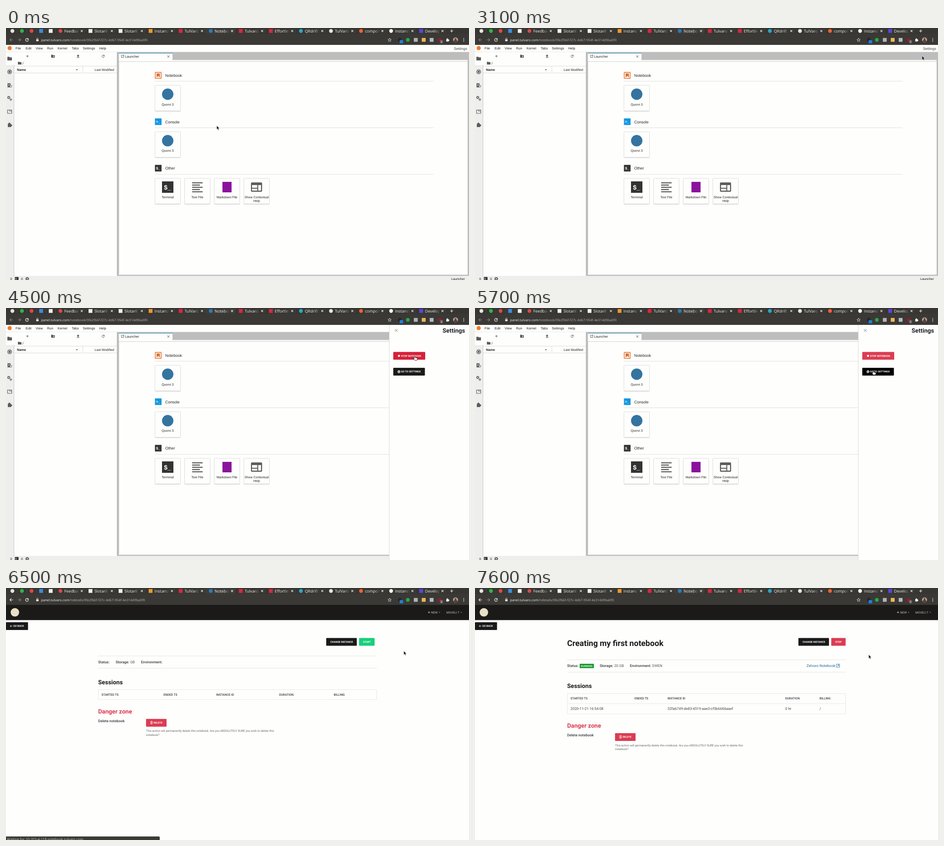
Write an HTML page that moves like this. It is 1015 by 552 pixels and loops after 8 s.

```html
<!DOCTYPE html>
<html lang="en">
<head>
<meta charset="utf-8">
<title>Notebook settings</title>
<style>
html, body { margin: 0; width: 100%; height: 100%; overflow: hidden; background: #fefefd }
svg { display: block }
text { white-space: pre; text-rendering: geometricPrecision }
.u { font-family: "Open Sans", "Noto Sans", sans-serif }
.a { font-family: "Liberation Sans", Arial, sans-serif }
.r { font-family: Roboto, sans-serif }
.m { font-weight: 500 }
.b { font-weight: 700 }
.mid { text-anchor: middle }
.end { text-anchor: end }
</style>
</head>
<body>
<svg id="stage" width="1015" height="552" viewBox="0 0 1015 552"></svg>
<script>
const WHITE = '#fefefd', BAR = '#3a3936', INK = '#212121', GREY = '#5c5c5c', RED = '#dc3c52', BLACK = '#1a1a1a';

// Shape helpers; text is placed by the middle of its capitals.
const rect = (x, y, w, h, fill, more = '') => `<rect x="${x}" y="${y}" width="${w}" height="${h}" fill="${fill}" ${more}/>`;
const circle = (x, y, r, fill, more = '') => `<circle cx="${x}" cy="${y}" r="${r}" fill="${fill}" ${more}/>`;
const square = (x, y, r, fill) => rect(x - r, y - r, 2 * r, 2 * r, fill);
const line = (d, color, w = 1, fill = 'none') => `<path d="${d}" stroke="${color}" stroke-width="${w}" fill="${fill}"/>`;
const fillPath = (d, fill) => `<path d="${d}" fill="${fill}"/>`;
const text = (x, y, s, size, cls, fill = INK) =>
  `<text x="${x}" y="${(y + size * .36).toFixed(2)}" font-size="${size}" class="${cls}" fill="${fill}">${s}</text>`;
const group = (id, body) => `<g id="${id}">${body}</g>`;

const cross = (x, y, r, color, w = 1) => line(`M${x - r} ${y - r}l${2 * r} ${2 * r}m0 ${-2 * r}l${-2 * r} ${2 * r}`, color, w);
const plus = (x, y, r, color, w = 1) => line(`M${x - r} ${y}h${2 * r}M${x} ${y - r}v${2 * r}`, color, w);
const gear = (x, y, r, color) =>
  circle(x, y, r * .6, 'none', `stroke="${color}" stroke-width="${r * .45}"`) +
  circle(x, y, r * .9, 'none', `stroke="${color}" stroke-width="${r * .35}" stroke-dasharray="${r * .36} ${r * .347}"`);
const folder = (x, y, s) => fillPath(`M${x - s} ${y - s * .8}h${s * .8}l${s * .25} ${s * .25}h${s * .95}v${s * 1.35}h${-2 * s}z`, GREY);
const puzzle = (x, y, s, color) =>
  rect(x - s * .8, y - s * .45, s * 1.45, s * 1.45, color) + circle(x - s * .1, y - s * .55, s * .42, color) + circle(x + s * .7, y + s * .25, s * .4, color);
const reload = (x, y, r, color, w) =>
  line(`M${x + r * .8} ${y - r * .6}A${r} ${r} 0 1 0 ${x + r} ${y + r * .3}`, color, w) + fillPath(`M${x + r * 1.1} ${y - r * 1.2}v${r * 1.1}h${-r * 1.1}z`, color);
const arrow = (x, y, dir, color) => line(`M${x - 3.5 * dir} ${y}h${7 * dir}m${-3.4 * dir} -3.4l${3.4 * dir} 3.4l${-3.4 * dir} 3.4`, color, 1.1);
const caret = (x, y, color) => fillPath(`M${x - 1.6} ${y - .8}h3.2l-1.6 1.7z`, color);
const button = (x, y, w, h, fill, label, tx, id = '') =>
  rect(x, y, w, h, fill, `rx="1.2" ${id && `id="${id}"`}`) + text(tx, y + h / 2, label, 5.5, 'r b', '#fff');

function browser() {
  const pins = [[circle, '#e4e4e2'], [circle, '#2bb741'], [circle, '#d9493f'], [square, '#3d8be0'], [square, '#efefed']];
  const tabs = [
    ['Feedback', circle, '#d9493f'], ['Slotaril', square, '#f2f2f0'], ['Slotaril', square, '#f2f2f0'], ['Instance', square, '#f0962e'],
    ['TulVaro', square, '#d8293b'], ['Notebook', circle, '#2b7cb8'], ['Tulvaro', square, '#d8293b'], ['Effortless', square, '#d8293b'],
    ['QRdrift', circle, '#27a9c9'], ['TulVaro', circle, '#e4e4e2'], ['component', circle, '#ef6130'], ['Instance', circle, '#f2f2f0'],
    ['Develop', square, '#5b45dd']];
  let s = `<defs><linearGradient id="fade"><stop stop-color="${BAR}" stop-opacity="0"/><stop offset="1" stop-color="${BAR}"/></linearGradient></defs>`;
  s += rect(0, 0, 1015, 37, BAR) + rect(0, 0, 1015, 13, '#373633') + rect(437, 0, 65, 13, '#3d3c39');
  pins.forEach(([mark, color], i) => s += mark(14 + 21 * i, 6.5, 4.2, color) + rect(24.5 + 21 * i, 2, .6, 9, '#504f4b'));
  tabs.forEach(([name, mark, color], i) => {
    const x = 119.3 + 65.9 * i;
    s += mark(x, 6.5, 4.2, color) +
      `<svg x="${x + 8.5}" y="0" width="32" height="13">${text(0, 6.7, name, 8.8, 'u', '#f0f0ee')}</svg>` +
      rect(x + 30, 0, 11, 13, 'url(#fade)') + cross(x + 46.8, 6.5, 2.2, '#f0f0ee', 1.1) + rect(x + 52.5, 2, .6, 9, '#504f4b');
  });
  s += plus(977, 6.5, 3.2, '#fff', 1.1) + arrow(29, 26, 1, '#85847f') + reload(46, 26, 3.2, '#f2f2f0', 1.2);
  s += group('backDim', arrow(12, 26, -1, '#85847f')) + group('backLit', arrow(12, 26, -1, '#f2f2f0'));
  s += rect(66.3, 25, 5, 4, '#eee') + line('M67.3 25v-1.5a1.5 1.5 0 0 1 3 0v1.5', '#eee', .9);
  s += `<text x="77" y="28.5" font-size="7.35" class="u" fill="#f4f4f2">panel.tulvaro.com<tspan id="path" fill="#b3b2ad"></tspan></text>`;
  s += line('M841 22.4l1.1 2.4 2.6.3-2 1.7.6 2.6-2.3-1.4-2.3 1.4.6-2.6-2-1.7 2.6-.3z', '#eee', .8);
  [[circle, '#262626'], [circle, '#2aa54b'], [square, '#b4b4b2'], [square, '#f0b75a'], [square, '#b5bcc2'], [square, '#84222d']]
    .forEach(([mark, color], i) => s += mark(863.5 + 17.4 * i, 26, 4.2, color));
  s += rect(863, 26.5, 7.5, 7, '#1c83dc', 'rx="1"') + rect(951.5, 26.5, 6.5, 7, '#666', 'rx="1"') + text(954.8, 30, '1', 5.5, 'a mid', '#fff');
  s += puzzle(968, 26, 3.6, '#f2f2f0');
  s += circle(985.5, 26, 5.5, '#b9a59a') + circle(985.5, 24.3, 2, '#5b3c36') + fillPath('M981.5 29.7a4 4 0 0 1 8 0 5.5 5.5 0 0 1-8 0z', '#5b3c36');
  return s + [23, 26, 29].map(y => circle(1003.5, y, .9, '#eee')).join('');
}

const prompt = (x, y, size, fill, mark) =>
  rect(x, y, size, size, fill) + text(x + size * .48, y + size * .5, mark, size * .56, 'a mid b', '#fff');

function card(x, y, label, icon, second = '') {
  return rect(x, y + .8, 56, 56.4, '#c9c9c9', 'rx="1.5"') + rect(x, y, 56, 56, WHITE, 'rx="1" stroke="#d6d6d6" stroke-width=".8"') +
    icon + text(x + 28, y + 41.5, label, 7, 'a mid') + text(x + 28, y + 49.2, second, 7, 'a mid');
}

function lab() {
  let s = rect(0, 37, 1015, 515, '#bdbdbd') + rect(0, 37, 1015, 15.5, WHITE) + circle(8, 44, 4.6, '#ee7b31');
  [['File', 21], ['Edit', 43], ['View', 65], ['Run', 90], ['Kernel', 113], ['Tabs', 144], ['Settings', 168.5], ['Help', 204.5]]
    .forEach(([name, x]) => s += text(x, 44.3, name, 7.4, 'a'));
  s += text(982, 45, 'Settings', 8, 'a', '#444');
  // Side bar
  s += rect(0, 52.5, 17.5, 490.5, '#eeeeed') + rect(0, 53, 18, 28, WHITE) + rect(17, 81, .8, 462, '#c4c4c4');
  s += folder(8, 67, 5) + circle(8, 96, 5, GREY) + circle(8, 96, 3.6, '#eee') + rect(5.8, 93.8, 4.4, 4.4, GREY);
  s += rect(3.4, 121, 6.5, 9, GREY) + line('M5 123.5h4M5 126h3', '#eee', .9) + circle(10.6, 127.4, 2.2, '#eee', `stroke="${GREY}"`);
  s += gear(6, 152.2, 3.2, GREY) + gear(10.6, 156.8, 2.5, GREY);
  s += line('M3.5 179.5h9v7.5h-9zM8 180v2h4.5', GREY, 1.2) + puzzle(8, 212, 5, GREY);
  // File browser
  s += rect(18, 52.5, 225, 490.5, WHITE) + plus(47, 61.7, 2.7, GREY);
  s += folder(103, 61.7, 4) + plus(104.5, 62.3, 1.4, '#fff', .8);
  s += fillPath('M158 58l3 3.3h-1.8v2.2h-2.4v-2.2H155zM155 64.3h6v1h-6z', GREY) + reload(213, 61.7, 2.6, GREY, 1);
  s += folder(30, 77, 3.9) + text(36.2, 77, '/', 7.5, 'a');
  s += line('M18 83.5h225M18 98.5h225M168.5 84v14', '#d4d4d4', .8);
  s += text(24, 91, 'Name', 7.3, 'a b') + text(237, 91, 'Last Modified', 7.2, 'a end') + fillPath('M153 92.2l2.4-2.4 2.4 2.4z', GREY);
  // Launcher tab and content
  s += rect(247, 69.5, 765, 471, WHITE) + line('M247 73.5h765', '#c4c4c4', .8) + line('M247.5 540V70H1012', '#a9a9a9', .6);
  s += rect(247.5, 55, 117.5, 18, WHITE) + rect(247.5, 54.8, 117.5, 1, '#2196b8');
  s += line('M255.5 59.5h-2.5v5h5v-2.5M256 59.2h2.4v2.4M258.2 59.4l-3 3', GREY, .9);
  s += text(261, 62, 'Launcher', 7.4, 'a') + cross(356, 62.5, 2.4, '#555');
  ['Notebook', 'Console', 'Other'].forEach((name, i) =>
    s += text(349, 104 + 101.6 * i, name, 8.6, 'a') + line(`M326 ${116.5 + 102 * i}H937`, '#dadada', .8));
  s += rect(327.2, 97.2, 13, 13, WHITE, 'stroke="#e0702f" stroke-width="1.5"') + fillPath('M330 99.5h7.4v9l-3.7-3.2-3.7 3.2z', '#e0702f');
  s += prompt(326.5, 198, 14.5, '#1497df', '&gt;_') + prompt(326.5, 299.8, 14.5, '#333', '$_');
  s += card(326.5, 125.5, 'Quorvi 3', circle(354.5, 145, 12.5, '#34749f'));
  s += card(326.5, 227.3, 'Quorvi 3', circle(354.5, 246.8, 12.5, '#34749f'));
  s += card(326.5, 329.3, 'Terminal', prompt(342, 336, 25, '#333', '$_'));
  s += card(391.5, 329.3, 'Text File', [0, 1, 2, 3, 4].map(i => rect(408, 338 + i * 4.9, i % 2 ? 17 : 23, 2.3, GREY)).join(''));
  s += card(456.5, 329.3, 'Markdown File', rect(474.5, 337, 20, 23, '#8a129c'));
  s += card(521.5, 329.3, 'Show Contextual', rect(538.2, 339.5, 22, 18, 'none', `rx="1" stroke="${GREY}" stroke-width="2.4"`) +
    rect(538, 339, 22, 5, GREY) + line('M538 351h14M552 344v14', GREY, 2), 'Help');
  // Status bar
  s += rect(0, 543, 1015, 9, '#eeeeed') + text(9.3, 549.5, '0', 7.2, 'a') + prompt(19.5, 545.5, 8, '#333', '$_') + text(33, 549.5, '0', 7.2, 'a');
  s += gear(46.5, 549.5, 3.8, '#555') + text(1006, 549.5, 'Launcher', 7.2, 'a end');
  return s;
}

function panel() {
  return rect(0, 37, 180, 515, WHITE) + line('M.2 37v515', '#d0d0d0', .8) + cross(15.5, 49, 3, '#777') +
    text(117, 49, 'Settings', 13.2, 'r b', '#212529') +
    button(9, 96.3, 70, 17, RED, 'STOP NOTEBOOK', 26, 'stop') + rect(19.5, 102.8, 4, 4, '#fff') +
    button(9, 131, 69.3, 17, BLACK, 'GO TO SETTINGS', 26, 'go') + gear(21.4, 139.5, 3, '#fff');
}

function details(loaded) {
  const dy = loaded ? 8.5 : 0, dz = loaded ? 31.3 : 0, y = 162 + dy, dark = '#343a40';
  let s = '';
  if (loaded) {
    s += text(202, 120.2, 'Creating my first notebook', 17.6, 'r b', BLACK);
    s += rect(229.5, 166, 31, 9.5, '#11962b') + text(245, 170.9, 'RUNNING', 5.9, 'r m mid', '#fff');
    s += text(790, y, 'Zelvoro Notebook', 8, 'r end', '#1b6b96') +
      line('M792.3 166.7h7v7h-7zM794.2 171.8l3.2-3.2M795 168.5h2.5v2.5', '#1b6b96', .8);
    s += button(709, 109.5, 67, 17, BLACK, 'CHANGE INSTANCE', 718) + button(781, 109.5, 31.5, 17, RED, 'STOP', 789.8);
  } else {
    s += button(702, 109.5, 67, 17, BLACK, 'CHANGE INSTANCE', 711) + button(774, 109.5, 34, 17, '#17cf7b', 'START', 782.6);
  }
  const pair = (x, key, value) =>
    `<text x="${x}" y="${y + 2.8}" font-size="7.95" class="r" fill="#555"><tspan class="m" fill="${dark}">${key}</tspan> ${value}</text>`;
  s += line(`M202 ${148.8 + dy}H813M202 ${175.8 + dy}H813`, '#e0e0e0', .8) + pair(202, 'Status:', '');
  s += loaded ? pair(273.5, 'Storage:', '20 GB') + pair(339.5, 'Environment:', 'DWEN')
    : pair(240.5, 'Storage:', 'GB') + pair(296, 'Environment:', '');
  s += text(202, 206 + dy, 'Sessions', 13.2, 'r b', BLACK);
  s += rect(202.4, 222.6 + dy, 610, loaded ? 44.8 : 22, 'none', 'stroke="#e2e2e2" stroke-width=".8"');
  const cols = loaded ? [209.3, 349.7, 422, 680, 755.3] : [209.3, 345.3, 460.7, 598.7, 718.4];
  ['STARTED TS', 'ENDED TS', 'INSTANCE ID', 'DURATION', 'BILLING'].forEach((h, i) =>
    s += text(cols[i], 233.4 + dy, h, 6.6, 'r m', dark));
  if (loaded) {
    s += line('M202 253.3H812.5', '#e2e2e2', .8);
    ['2020-11-21 16:54:08', '', '32fab749-de83-4519-aae3-cf5b6684aaef', '0 hr', '/'].forEach((v, i) =>
      s += text(cols[i], 264.4, v, 7.9, 'r', '#444'));
  }
  s += text(202, 270.4 + dz, 'Danger zone', 13.2, 'r b', RED) + text(202, 291 + dz, 'Delete notebook', 7.95, 'r m', dark);
  s += button(307, 286.7 + dz, 45, 17, RED, 'DELETE', 323.5);
  s += line(`M316.3 ${292.8 + dz}h5.4M318 ${292.6 + dz}v-1h2v1M317 ${293 + dz}l.3 5h3.4l.3-5M318.4 ${294 + dz}v3M319.7 ${294 + dz}v3`, '#fff', .7);
  s += text(307, 313 + dz, 'This action will permanently delete this notebook. Are you ABSOLUTELY SURE you wish to delete this', 6.3, 'r', '#666');
  return s + text(307, 321.8 + dz, 'notebook?', 6.3, 'r', '#666');
}

function site() {
  return rect(0, 37, 1015, 515, WHITE) + rect(0, 37, 1015, 33.3, '#1b1a19') + circle(19.5, 53.3, 9.3, '#e9dfc4') +
    plus(927.3, 53.3, 2.3, '#a0a0a0', 1.2) + text(932, 53.5, 'NEW', 6.6, 'r m', '#a0a0a0') + caret(950.3, 53.5, '#a0a0a0') +
    text(965.3, 53.5, 'MOVELI T', 6.5, 'r m', '#a0a0a0') + caret(998, 53.5, '#a0a0a0') +
    button(0, 75, 48.3, 17, BLACK, 'GO BACK', 16) + line('M13.8 83.4h-4.6m1.9-1.9l-1.9 1.9 1.9 1.9', '#fff', .9) +
    group('loading', details(false)) + group('loaded', details(true));
}

const pointers =
  group('tip', '<path d="M0 0V8.4L1.9 6.6 3.2 9.7 4.7 9 3.4 6H6z" fill="#151515" stroke="#fff" stroke-width=".5"/>') +
  group('hand', '<path d="M-1 .8Q0-.9 1 .8V4L5 5Q6.2 5.4 5.8 7L5 10H0L-3 6.4Q-3 4.8-1 6.6Z" fill="#fff" stroke="#111" stroke-width=".8"/>');

document.getElementById('stage').innerHTML =
  lab() + group('panel', panel()) + group('site', site()) +
  group('bubble', rect(-3, 544.3, 340, 12, BAR, 'rx="2"') + text(2, 550, 'Waiting for 10-203-4-118.notebook.tulvaro.com', 7.6, 'u', '#cfcfcb')) +
  browser() + group('cursor', pointers);

// Keys: time, then values.
const MOUSE = [[1000, 462, 214], [1300, 456, 203], [1500, 456, 203], [1800, 452.5, 211], [2100, 452.5, 211], [2200, 583, 208],
  [2400, 775, 172], [2600, 905, 115], [2800, 956, 80], [2900, 956, 80], [3200, 992, 52], [3400, 1007, 45], [3900, 1007, 45],
  [4200, 945, 75], [4400, 903, 99], [4500, 896, 104.5], [4700, 898, 108.5], [5000, 898, 108.5], [5500, 903, 136.5],
  [5600, 903, 136.5], [5700, 873, 136.5], [6400, 872, 137.5], [6500, 872, 138], [7000, 885, 144], [7300, 885, 144], [7600, 863, 146]];
const SLIDE = [[3500, 1016], [3600, 998], [3700, 928], [3800, 875], [3900, 850.5], [4000, 841], [4100, 840]];

function at(keys, t) {
  const i = keys.findIndex(k => k[0] > t);
  if (i < 0) return keys[keys.length - 1].slice(1);
  if (i === 0) return keys[0].slice(1);
  const a = keys[i - 1], b = keys[i], p = (t - a[0]) / (b[0] - a[0]);
  return a.slice(1).map((v, j) => v + (b[j + 1] - v) * p);
}

const el = id => document.getElementById(id);
const show = (id, on) => el(id).style.display = on ? '' : 'none';

function draw(now) {
  const t = Math.floor(now % 8000 / 100) * 100; // the picture steps ten times a second
  const [x, y] = at(MOUSE, t), [left] = at(SLIDE, t);
  const leaving = t >= 6200, onSite = t >= 6500, ready = t >= 6800;
  const inPanel = t >= 4000 && !onSite && x > 849 && x < 919;
  const onStop = inPanel && y > 96 && y < 113.5, onGo = inPanel && y > 131 && y < 148;
  const hand = onStop || onGo || (t < 4000 && x > 980 && y < 53);

  el('panel').setAttribute('transform', `translate(${left})`);
  el('stop').setAttribute('fill', onStop ? '#d6213a' : RED);
  el('go').setAttribute('fill', onGo ? '#000' : BLACK);
  el('path').textContent = (leaving ? '/ndetails/' : '/notebook/') + '0fe2f66f-f27c-4d67-954f-4e314d9ba0f0';
  show('backDim', !leaving);
  show('backLit', leaving);
  show('bubble', leaving && !ready);
  show('site', onSite);
  show('loading', !ready);
  show('loaded', ready);
  el('cursor').setAttribute('transform', `translate(${x.toFixed(1)} ${y.toFixed(1)})`);
  show('tip', !hand);
  show('hand', hand);
}

function tick() {
  draw(performance.now());
  requestAnimationFrame(tick);
}
tick();
</script>
</body>
</html>
```
